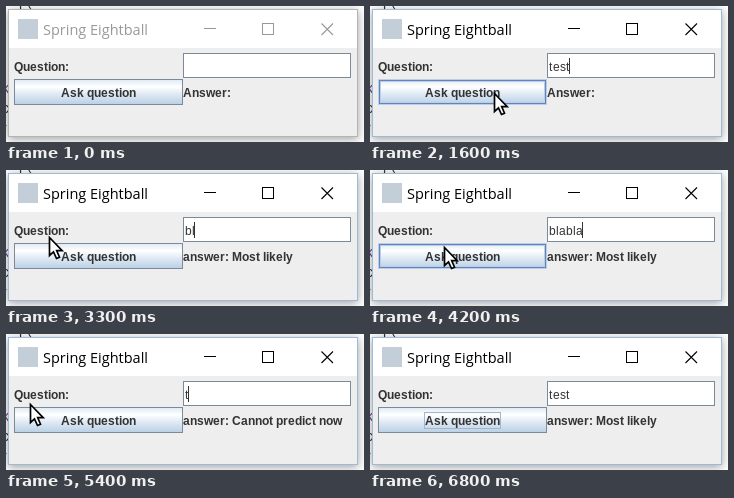
Recreate the animation shown at these times as an HTML page with a canvas. Size 358 px wide and 136 px high, loop 7100 ms.

```html
<!DOCTYPE html>
<html lang="en">
<head>
<meta charset="utf-8">
<title>Spring Eightball</title>
<style>
  html, body { margin: 0; width: 100%; height: 100%; overflow: hidden; background: #fff; }
  canvas { display: block; }
</style>
</head>
<body>
<canvas id="stage" width="358" height="136"></canvas>
<script>
const ctx = document.getElementById('stage').getContext('2d');
const LOOP = 7100, LAST = 6800, TICK = 100, DRAG = 300;
const BOLD = 'bold 12px "Liberation Sans", Arial, sans-serif';
const PLAIN = '12px "Liberation Sans", Arial, sans-serif';
const TITLE = '14.5px "Open Sans", "Noto Sans", sans-serif';
const FIELD = { x: 177, y: 47, w: 168, h: 25 };
const BUTTON = { x: 8, y: 73, w: 169, h: 26 };
const EDGE = '#7a8a99', PALE = '#b8cfe5', DEEP = '#6382bf', INK = '#333333';

// Each round: grab the field, drag to a resting place, type a word, click the button
const ROUNDS = [
  { grab: 600, rest: [215, 57], type: 900, word: 'test',
    click: 1700, press: [124, 87], leave: 1700, reply: 'Most likely' },
  { grab: 2400, rest: [43, 67], type: 3200, word: 'blabla',
    click: 4400, press: [85, 80], leave: 4800, reply: 'Cannot predict now' },
  { grab: 5000, rest: [24, 70], type: 5400, word: 'test',
    click: 6200, press: [98, 88], leave: 6400, reply: 'Most likely' }
];
const ENTER = [122, 138], GRAB = [253, 70], EXIT = [-20, 138];

const path = [
  [TICK, ENTER],
  ...ROUNDS.flatMap(r => [
    [r.grab, GRAB], [r.grab + DRAG, r.rest],
    [r.click - 4 * TICK, r.rest], [r.click - TICK, r.press], [r.leave, r.press]
  ]),
  [LAST, EXIT]
];

const smooth = k => k * k * (3 - 2 * k);
const inside = (p, r) => p.x >= r.x && p.x < r.x + r.w && p.y >= r.y && p.y < r.y + r.h;
const inset = ({ x, y, w, h }, n) => ({ x: x + n, y: y + n, w: w - 2 * n, h: h - 2 * n });

function pointerAt(t) {
  const next = Math.max(1, path.findIndex(([time]) => time >= t));
  const [t0, a] = path[next - 1], [t1, b] = path[next];
  const k = smooth(Math.max(0, t - t0) / (t1 - t0));
  const [x, y] = a.map((v, i) => Math.round(v + (b[i] - v) * k));
  return { x, y };
}

function stateAt(t) {
  const i = ROUNDS.findLastIndex(r => r.grab <= t);
  const round = ROUNDS[i];
  const answered = ROUNDS.findLast(r => r.click + TICK <= t);
  const state = { value: '', answer: answered ? 'answer: ' + answered.reply : 'Answer:' };
  if (!round) return state;
  const typing = t >= round.type;
  state.value = typing
    ? round.word.slice(0, (t - round.type) / TICK + 1)
    : i ? ROUNDS[i - 1].word : '';
  state.selecting = !typing;
  state.focus = t < round.click ? 'field' : 'button';
  state.pressed = t >= round.click && t < round.click + TICK;
  return state;
}

function fill(color, x, y, w, h) {
  ctx.fillStyle = color;
  ctx.fillRect(x, y, w, h);
}

function outline(color, { x, y, w, h }) {
  ctx.strokeStyle = color;
  ctx.lineWidth = 1;
  ctx.strokeRect(x + .5, y + .5, w - 1, h - 1);
}

function text(str, x, y, font, color = INK) {
  ctx.font = font;
  ctx.fillStyle = color;
  ctx.fillText(str, x, y);
}

// Letter positions when every advance is a whole pixel
function letterStops(str, x, font, snap) {
  ctx.font = font;
  const stops = [x];
  for (const ch of str) stops.push(x += snap(ctx.measureText(ch).width));
  return stops;
}

function label(str, x, y) {
  const stops = letterStops(str, x, BOLD, Math.round);
  [...str].forEach((ch, i) => text(ch, stops[i], y, BOLD));
}

function strokeLines(color, width, ...lines) {
  ctx.strokeStyle = color;
  ctx.lineWidth = width;
  ctx.beginPath();
  for (const [x0, y0, x1, y1] of lines) {
    ctx.moveTo(x0, y0);
    ctx.lineTo(x1, y1);
  }
  ctx.stroke();
}

function drawBackdrop() {
  fill('#fff', 0, 0, 358, 136);
  const font = '14px "Liberation Sans", Arial, sans-serif';
  text('p(', 13, 0, font);
  [...'lkcr'].forEach((ch, i) =>
    text(ch, -4, [28, 87, 107, 127][i], font, ch === 'k' ? '#6a3d9a' : INK));
}

function drawWindow(active) {
  const frame = { x: 2, y: 3, w: 350, h: 128 };
  ctx.save();
  ctx.shadowColor = 'rgba(0,0,0,.38)';
  ctx.shadowBlur = 9;
  ctx.shadowOffsetY = 2;
  fill('#fff', frame.x, frame.y, frame.w, frame.h);
  ctx.restore();
  fill('#eeeeee', 3, 42, 348, 88);
  outline(active ? '#9dbbd9' : '#b4b4b4', frame);
  fill('#c3ced9', 12, 13, 20, 20);

  const ink = active ? '#000' : '#999';
  text('Spring Eightball', 37, 29, TITLE, ink);
  strokeLines(ink, 1, [198, 22.5, 210, 22.5]);
  outline(ink, { x: 256, y: 17, w: 12, h: 12 });
  strokeLines(ink, 1.1, [315.5, 17.5, 327, 29], [327, 17.5, 315.5, 29]);
}

function drawField({ value, selecting, focus }, pointer) {
  fill('#fff', FIELD.x, FIELD.y, FIELD.w, FIELD.h);
  outline(EDGE, FIELD);
  const stops = letterStops(value, 179, PLAIN, w => Math.ceil(w - .1));
  const end = stops[value.length];
  const caret = selecting ? stops.find(x => x >= pointer.x) ?? end : end;
  fill(PALE, caret, 52, end - caret, 16);
  [...value].forEach((ch, i) => text(ch, stops[i], 65, PLAIN));
  if (focus === 'field') fill(INK, caret - 1, 52, 1, 16);
}

function drawButton({ pressed, focus }, hover) {
  const { x, y, w, h } = BUTTON;
  const shade = ctx.createLinearGradient(0, y, 0, y + h);
  ['#dde8f3', '#fff', '#dde8f3'].forEach((color, i) => shade.addColorStop(i * .3, color));
  shade.addColorStop(1, PALE);
  fill(pressed ? PALE : shade, x, y, w, h);
  if (hover && !pressed) {
    [PALE, DEEP, PALE].forEach((color, i) => outline(color, inset(BUTTON, i)));
  } else {
    outline(EDGE, BUTTON);
  }
  label('Ask question', 55, 91);
  if (focus === 'button') outline('#a3b8cc', { x: 54, y: 78, w: 77, h: 17 });
}

function drawPointer({ x, y }) {
  if (inside({ x, y }, FIELD)) {
    strokeLines('#000', 1, [x + .5, y - 8, x + .5, y + 9],
      [x - 3, y - 8.5, x + 4, y - 8.5], [x - 3, y + 9.5, x + 4, y + 9.5]);
    return;
  }
  const arrow = new Path2D('M0 0V18L4 14.4L7 21L10 19.7L7.2 13.2H12.7Z');
  ctx.save();
  ctx.translate(x + .5, y + .5);
  ctx.fillStyle = '#fff';
  ctx.fill(arrow);
  ctx.strokeStyle = '#000';
  ctx.lineWidth = 1.7;
  ctx.stroke(arrow);
  ctx.restore();
}

function render(t) {
  const pointer = pointerAt(t);
  const state = stateAt(t);
  drawBackdrop();
  drawWindow(state.focus);
  label('Question:', 8, 65);
  drawField(state, pointer);
  drawButton(state, inside(pointer, BUTTON));
  label(state.answer, 177, 91);
  drawPointer(pointer);
}

const start = performance.now();
function frame() {
  const t = (performance.now() - start) % LOOP;
  render(Math.min(LAST, Math.floor(t / TICK) * TICK));
  requestAnimationFrame(frame);
}
frame();
</script>
</body>
</html>
```
